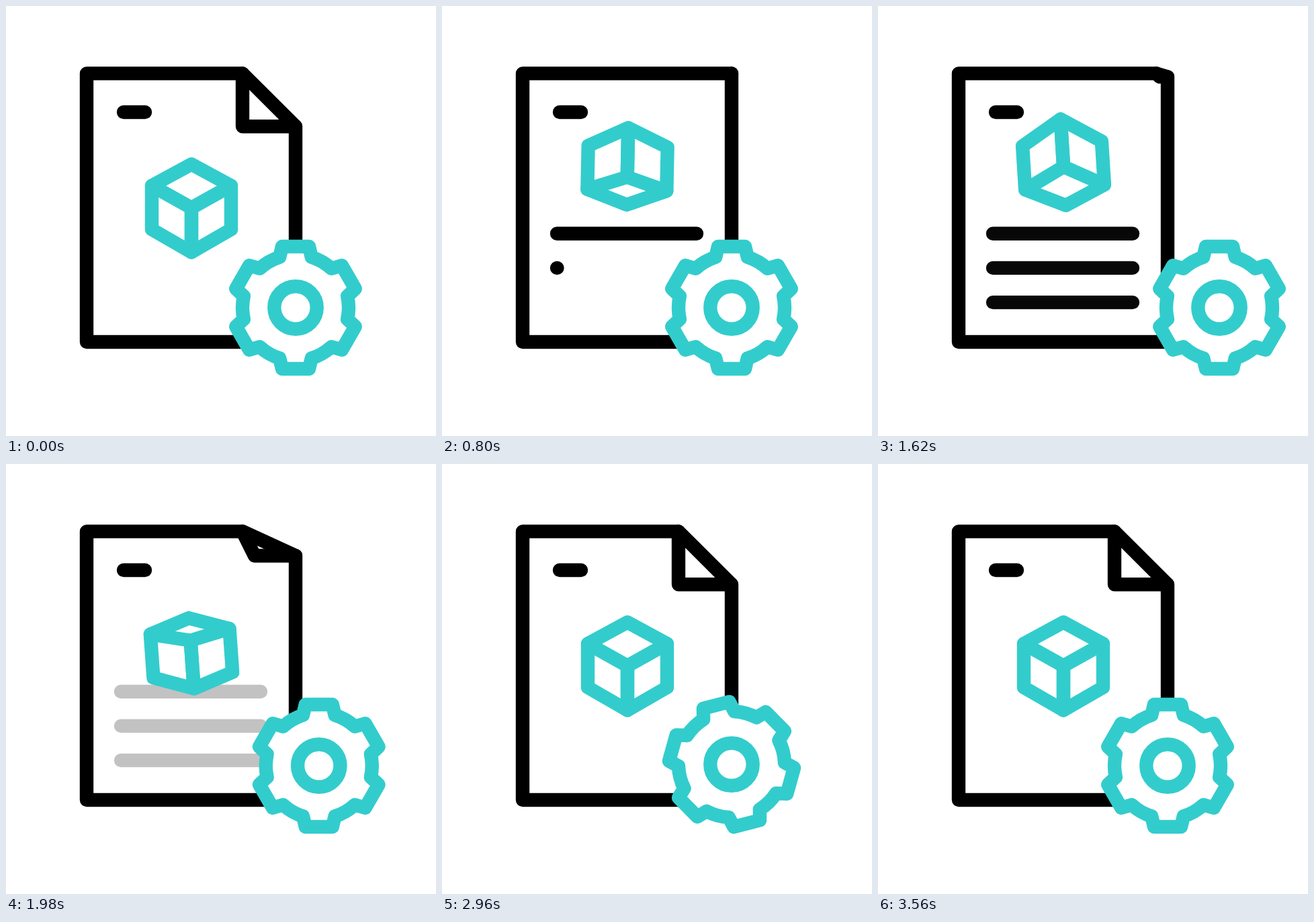
An HTML page with a canvas for the animation above (3.6 s loop, 640 by 640 pixels).

```html
<!DOCTYPE html>
<html lang="en">
<head>
<meta charset="utf-8">
<title>Document settings icon</title>
<style>
  html, body { margin: 0; width: 100%; height: 100%; overflow: hidden; background: #fff; }
  canvas { display: block; width: 640px; height: 640px; }
</style>
</head>
<body>
<canvas id="stage" width="640" height="640"></canvas>
<script>
const ctx = document.getElementById('stage').getContext('2d');
const LOOP = 3600, BLACK = '#000', TEAL = '#33cccc', RAD = Math.PI / 180;

const mix = (a, b, k) => a + (b - a) * k;
const clamp = k => Math.min(1, Math.max(0, k));
const ramp = (t, from, to) => (1 - Math.cos(Math.PI * clamp((t - from) / (to - from)))) / 2;
const pulse = (t, rise, top, fall, end) => ramp(t, rise, top) - ramp(t, fall, end);
const hop = (t, from, to) => pulse(t, from, (from + to) / 2, (from + to) / 2, to);

function poly(points, closed) {
  ctx.beginPath();
  points.forEach(p => ctx.lineTo(...p));
  if (closed) ctx.closePath();
  ctx.stroke();
}

function drawPage(t) {
  // The corner lifts first, then slides out flat.
  const lift = pulse(t, 0, 420, 1900, 2160);
  const flat = pulse(t, 420, 800, 1500, 1900);
  const edge = 100.4, right = 431;
  const sideY = mix(mix(179.3, 124.4, lift), edge, flat);
  const top = [mix(352, right, flat), edge];
  const side = [right, sideY];
  const inner = [mix(mix(352, 375, lift), right, flat), sideY];
  poly([top, [120, edge], [120, 500], [right, 500], side], true);
  poly([top, inner, side]);
  poly([[175, 158], [207, 158]]);
}

function drawLines(t) {
  ctx.globalAlpha = 1 - clamp((t - 1605) / 495);
  for (let i = 0; i < 3; i++) {
    const start = 400 * (i + 1);
    if (t < start) break;
    const grow = ramp(t, start, start + 400);
    const y = 338.7 + 51.2 * i + (i ? 0 : 10 * (1 - grow));
    poly([[171, y], [171.5 + 207.5 * grow, y]]);
  }
  ctx.globalAlpha = 1;
}

function drawCube(t) {
  // 1 seen from above, -1 seen from below
  const view = 1 - 2 * pulse(t, 0, 1070, 1620, 2160);
  const swing = clamp(t / 2160);
  const tilt = -(1.8 + t / 500) * Math.sin(3 * Math.PI * swing);
  const y = 300 - 59.5 * pulse(t, 0, 733, 1620, 2160) + 0.9 * tilt;
  const near = 37.2 - 1.2 * view - 3 * view * view;
  const far = 36.3 + 2.5 * view - 7.8 * view * view;
  const mid = 33.5 * view, w = 59, h = 32.5;

  ctx.save();
  ctx.translate(276, y);
  ctx.rotate(tilt * RAD);
  for (const x of [-w, w]) poly([[0, mid - near], [x, -h], [x, h], [0, mid + near]], true);
  const lid = view > 0 ? -1 : 1;
  poly([[-w, lid * h], [0, lid * far - mid], [w, lid * h]]);
  ctx.restore();
}

function drawGear(t) {
  const x = 431 + 77 * pulse(t, 1200, 1600, 1620, 2300);
  const y = 449 - 48 * (hop(t, 2200, 2920) + hop(t, 2920, 3560));
  const turn = 46 * pulse(t, 2200, 2920, 2920, 3560);
  const body = 79, tip = 93.2, bodyHalf = 17.5, tipHalf = 12.4;
  const corner = (r, deg) => ctx.lineTo(r * Math.cos(deg * RAD), r * Math.sin(deg * RAD));

  ctx.save();
  ctx.translate(x, y);
  ctx.rotate(turn * RAD);
  ctx.beginPath();
  for (let a = -90; a < 270; a += 60) {
    corner(body, a - bodyHalf);
    corner(tip, a - tipHalf);
    corner(tip, a + tipHalf);
    ctx.arc(0, 0, body, (a + bodyHalf) * RAD, (a + 60 - bodyHalf) * RAD);
  }
  ctx.closePath();
  ctx.fill();
  ctx.stroke();
  ctx.beginPath();
  ctx.arc(0, 0, 31.7, 0, 2 * Math.PI);
  ctx.stroke();
  ctx.restore();
}

function frame(now) {
  const t = now % LOOP;
  ctx.fillStyle = '#fff';
  ctx.fillRect(0, 0, 640, 640);
  ctx.lineWidth = 20.4;
  ctx.lineCap = ctx.lineJoin = 'round';
  ctx.strokeStyle = BLACK;
  drawPage(t);
  drawLines(t);
  ctx.strokeStyle = TEAL;
  drawCube(t);
  drawGear(t);
  requestAnimationFrame(frame);
}
requestAnimationFrame(frame);
</script>
</body>
</html>
```
